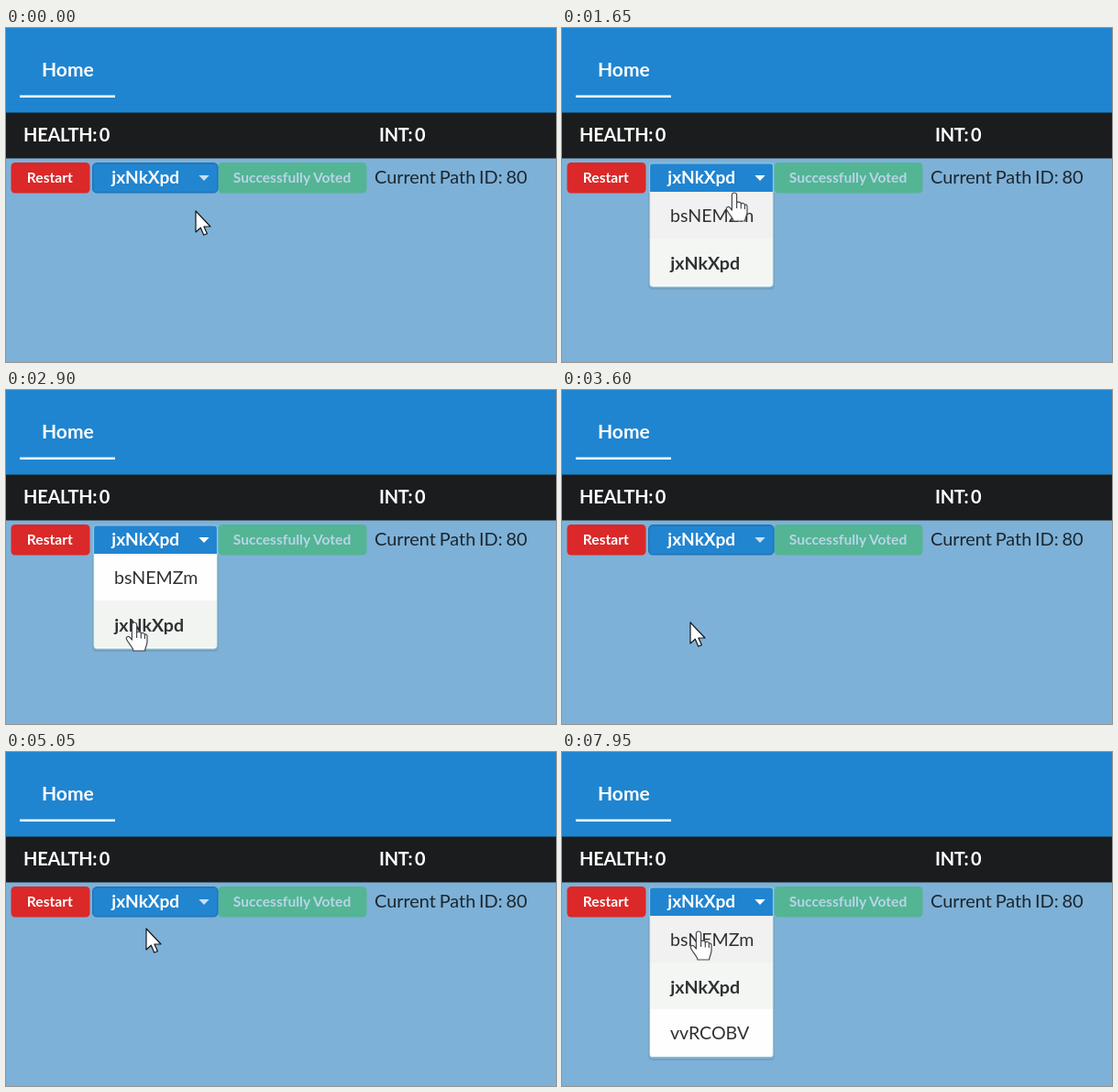
An HTML page for the animation above (8 s loop, 600 by 365 pixels).

```html
<!DOCTYPE html>
<html lang="en">
<head>
<meta charset="utf-8">
<title>Path vote</title>
<style>
  html, body { margin: 0; width: 100%; height: 100%; overflow: hidden; background: #7eb1d7; }
  svg { display: block; width: 600px; height: 365px; font-family: Lato, sans-serif; }
  .bold { font-weight: 700; }
  .white { fill: #fff; }
  .mid { font-size: 20px; }
  .stat { letter-spacing: -.25px; word-spacing: -2px; }
  .path { letter-spacing: -.05px; word-spacing: -1.3px; }
  .small { font-size: 15.6px; }
  .item { fill: #303132; font-size: 19.6px; }
  .lit { stroke: #96c8da; stroke-width: 1.2; }
  .cursor { fill: #fff; stroke: #15171c; stroke-width: 1.2; stroke-linejoin: round; }
  #hand { stroke: #45484e; }
</style>
</head>
<body>
<svg viewBox="0 0 600 365">
  <defs>
    <clipPath id="menuClip"><path id="menuEdge"/></clipPath>
  </defs>

  <rect width="600" height="365" fill="#7eb1d7"/>
  <rect width="600" height="93" fill="#1f85d0"/>
  <text class="bold white" x="39" y="52.6" font-size="21">Home</text>
  <rect class="white" x="15" y="73.5" width="104" height="2.5"/>

  <rect y="92.5" width="600" height="50" fill="#1b1c1d"/>
  <text class="bold white mid stat" x="19" y="123.5">HEALTH: 0</text>
  <text class="bold white mid stat" x="407" y="123.5">INT: 0</text>

  <rect x="5.5" y="147" width="86" height="33.5" rx="4.5" fill="#db2828"/>
  <text class="bold white small" x="22.8" y="169">Restart</text>

  <g opacity=".45">
    <rect x="231.5" y="147" width="162" height="33.5" rx="4.5" fill="#21ba45"/>
    <text class="bold white small" x="247.8" y="169">Successfully Voted</text>
  </g>
  <text class="mid path" x="402" y="170" fill="#1c2730">Current Path ID: 80</text>

  <rect id="idleBox" x="94.7" y="147.7" width="136.2" height="32.2" rx="4.5" fill="#2185d0" stroke="#1e73b6" stroke-width="1.4"/>
  <path id="pressedBox" class="lit" fill="#2084d1"/>
  <text class="bold white" x="115.3" y="170" font-size="19.1">jxNkXpd</text>
  <path id="caret" class="white" d="M210.3 161h11.4l-5.7 6z"/>

  <g id="menu">
    <path id="shadow" transform="translate(0 1.5)" fill="none" stroke="#222426" stroke-opacity=".12" stroke-width="3"/>
    <g clip-path="url(#menuClip)">
      <rect id="row0" x="95" y="179" width="136" height="51"/>
      <rect id="row1" x="95" y="230" width="136" height="51"/>
      <rect id="row2" x="95" y="281" width="136" height="52"/>
      <text class="item" x="118" y="212">bsNEMZm</text>
      <text class="item bold" x="118.3" y="263.5">jxNkXpd</text>
      <text class="item" x="118" y="314.3">vvRCOBV</text>
    </g>
    <path id="frame" class="lit" fill="none"/>
  </g>

  <path id="arrow" class="cursor" d="M0 0V23L5.3 18.2L8.8 26.3L12.4 24.8L8.9 17H16Z"/>
  <g id="hand" class="cursor">
    <path d="M-2.6 2.6A2.6 2.6 0 0 1 2.6 2.6V11C3.5 9.5 7 9.7 7.3 12C8.5 10.8 11.2 11.3 11.4 13.5C12.4 12.4 14 13.2 14 15.5V21C14 25 12 26.5 11.6 31H-1C-1 28 -6.3 23 -8.4 18.5C-9.6 16 -6.8 14.2 -4.8 16.4L-2.6 19Z"/>
    <path fill="none" d="M2.6 11V17M7.3 12V17.5M11.4 13.5V18"/>
  </g>
</svg>
<script>
const LOOP = 8000, STEP = 50;
const el = id => document.getElementById(id);
const show = (id, on) => el(id).setAttribute("visibility", on ? "visible" : "hidden");
const clamp = v => Math.max(0, Math.min(1, v));

// Cursor stops: time, x, y
const stops = [
  [0, 207, 200], [400, 188, 167], [1400, 188, 167], [1650, 188, 180],
  [1700, 188, 180], [2250, 152, 236], [2450, 143, 247], [2650, 143, 247],
  [2900, 140, 254], [3950, 140, 254], [4300, 145, 211], [4550, 153, 194],
  [5000, 153, 194], [5050, 153, 193], [5200, 157, 183], [5450, 157, 183],
  [5550, 160, 177], [5700, 160, 177], [5850, 161, 167], [7500, 161, 167],
  [7700, 150, 194], [7900, 150, 194], [7950, 149, 196], [LOOP, 149, 196]
];

// Menu sessions: press, open, open duration, close, rows
const sessions = [
  { press: 550, open: 700, grow: 100, close: 3500, rows: 2 },
  { press: 6800, open: 6950, grow: 150, close: Infinity, rows: 3 }
];

function cursorAt(t) {
  const i = stops.findIndex(s => s[0] > t);
  const [t0, x0, y0] = stops[i - 1], [t1, x1, y1] = stops[i];
  const k = (t - t0) / (t1 - t0);
  return [x0 + (x1 - x0) * k, y0 + (y1 - y0) * k];
}

function outline(rows) {
  const bottom = 179 + 51 * rows;
  return `M95.5 179V${bottom - 2}q0 4 4 4H226.5q4 0 4 -4V179`;
}

function drawMenu(t, y) {
  const s = sessions.find(s => t >= s.press && t < s.close + 100);
  const opening = s ? clamp((t - s.open + STEP) / s.grow) : 0;
  const closing = s ? clamp((t - s.close + STEP) / 150) : 0;
  const amount = opening * (1 - closing);
  const open = amount > 0;

  show("idleBox", !s);
  show("pressedBox", s);
  show("menu", open);
  const left = open ? "M95.5 180" : "M98.5 180q-3 0 -3 -3";
  const right = open ? "V180" : "V177q0 3 -3 3Z";
  el("pressedBox").setAttribute("d", `${left}V151q0 -3 3 -3H227.5q3 0 3 3${right}`);
  el("caret").setAttribute("opacity", open ? 1 : .75);
  if (!open) return;

  const edge = outline(s.rows);
  for (const id of ["menuEdge", "shadow", "frame"]) el(id).setAttribute("d", edge);
  const hover = y < 179 ? -1 : Math.floor((y - 179) / 51);
  for (let i = 0; i < 3; i++) {
    const rest = i === 1 ? "#f4f6f4" : "#fdfefd";
    el("row" + i).setAttribute("fill", i !== hover ? rest : i === 1 ? "#f2f4f2" : "#f0f1f0");
  }
  el("menu").setAttribute("transform", `translate(0 ${179 * (1 - amount)}) scale(1 ${amount})`);
  el("menu").setAttribute("opacity", amount);
}

function draw(now) {
  const t = Math.floor((now % LOOP) / STEP) * STEP;
  const [x, y] = cursorAt(t);
  const onButton = y < 180 && x > 95 && x < 231;
  const onMenu = sessions.some(s => t >= s.open && t < s.close + 50);
  const pointing = onButton || onMenu;
  drawMenu(t, y);
  show("hand", pointing);
  show("arrow", !pointing);
  el(pointing ? "hand" : "arrow").setAttribute("transform", `translate(${x} ${y})`);
}

let start;
function tick(now) {
  start ??= now;
  draw(now - start);
  requestAnimationFrame(tick);
}
draw(0);
requestAnimationFrame(tick);
</script>
</body>
</html>
```
